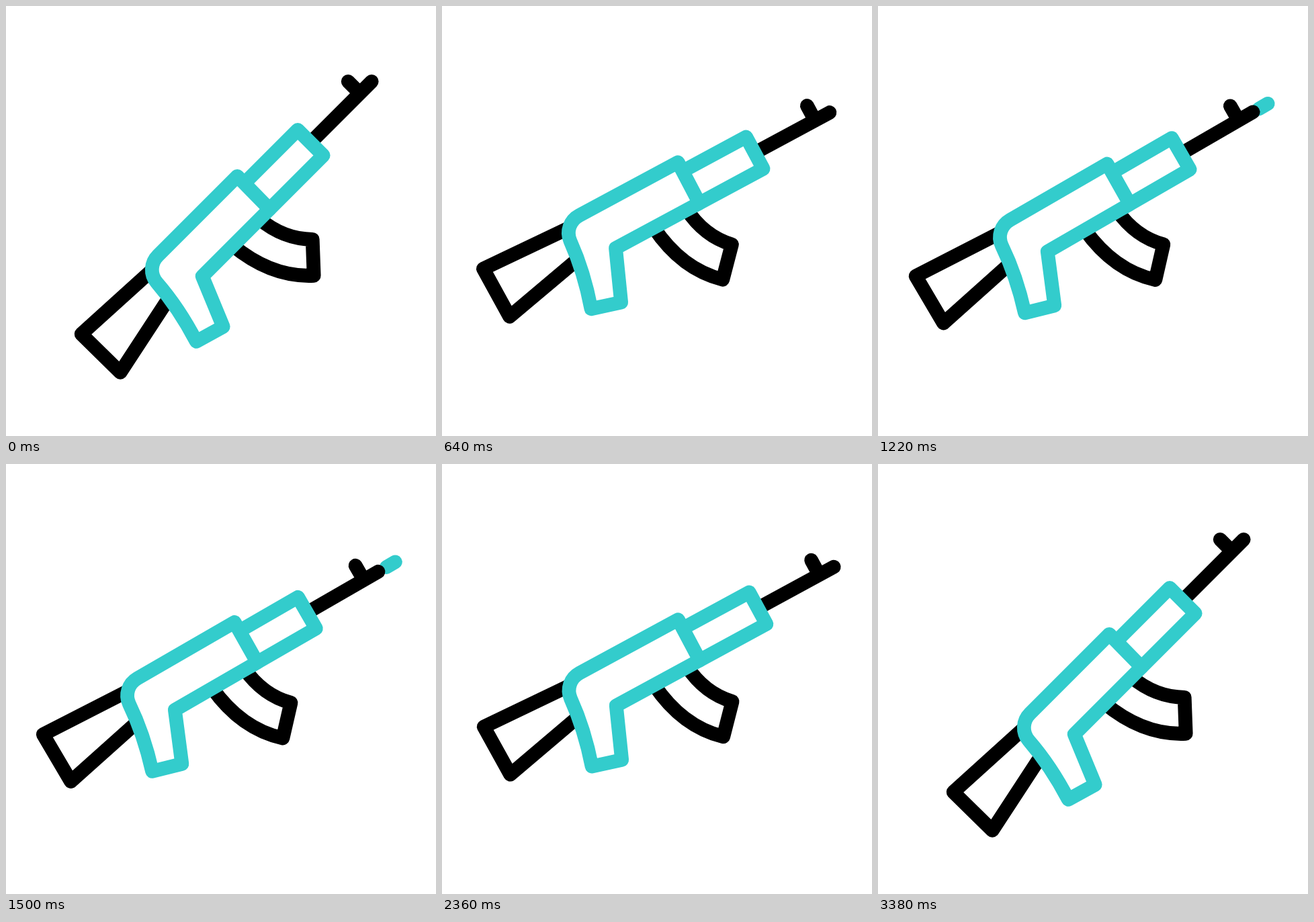
Write an HTML page with a canvas that moves like this. It is 640x640 px and loops after 3.62 s.

```html
<!DOCTYPE html>
<html lang="en">
<head>
<meta charset="utf-8">
<title>Icon loop</title>
<style>
html, body { margin: 0; width: 100%; height: 100%; overflow: hidden; background: #fff; }
canvas { display: block; width: 100vmin; height: 100vmin; }
</style>
</head>
<body>
<canvas id="stage" width="640" height="640"></canvas>
<script>
const ctx = document.getElementById('stage').getContext('2d');
const LOOP = 3620, STEP = 20;
const TEAL = '#33cccc', BLACK = '#000';
const SHOT = 260, SHOTS = 5, FIRST = 680;
const RAD = Math.PI / 180;

const shapes = {
  stock: new Path2D('M217 393L112 488L170 545L240 438'),
  mag: new Path2D('M376 316Q413 347 456 347L458 401Q395 404 337 356Z'),
  barrel: new Path2D('M453 203L544 112M509 112L523 126'),
  guard: new Path2D('M354 264L434 184L472 222L392 302'),
  body: new Path2D('M344 253L226 371C215 382 214 399 224 411Q257 449 283 499L323 477L292 402L392 302Z')
};

// Poses: angle in degrees, then where the stage centre lands
const REST = [0, 320.2, 320.3];
const AIM = [15, 301.6, 292.9];
const LIFT = [17.5, 312.3, 288.6];
const LEAVE = [16.5, 309.4, 289];

const part = (t, a, b) => Math.min(1, Math.max(0, (t - a) / (b - a)));
const ease = (t, a, b) => { const u = part(t, a, b); return u * u * (3 - 2 * u); };
const mix = (p, q, k) => p.map((v, i) => v + (q[i] - v) * k);

function poseAt(t) {
  if (t < 580) return mix(REST, LIFT, ease(t, 205, 580));
  if (t < 2080) return mix(LIFT, AIM, ease(t, 580, 740));
  if (t < 2370) return mix(AIM, LEAVE, ease(t, 2080, 2370));
  return mix(LEAVE, REST, ease(t, 2370, 2700));
}

function kickAt(t) {
  const s = t - FIRST + 20;
  if (s < 0 || s >= SHOT * SHOTS) return 0;
  const q = s % SHOT;
  return q < 100 ? ease(q, 0, 100) : 1 - ease(q, 100, SHOT);
}

function magAt(t) {
  if (t < 2950) return 1 - Math.pow(1 - part(t, 2380, 2900), 2.55);
  return 1 - ease(t, 2950, 3380);
}

function draw(path, color, filled) {
  if (filled) {
    ctx.fillStyle = '#fff';
    ctx.fill(path);
  }
  ctx.strokeStyle = color;
  ctx.stroke(path);
}

// Shift along the barrel axis; positive is forward
function along(d, fn) {
  ctx.save();
  ctx.translate(d * Math.SQRT1_2, -d * Math.SQRT1_2);
  fn();
  ctx.restore();
}

function drawBullet(t) {
  const s = t - FIRST;
  if (s < 0 || s >= SHOT * SHOTS) return;
  const u = Math.min(1, (s % SHOT) / 240);
  along(42 * Math.pow(u, 3.6), () => {
    const p = new Path2D();
    p.moveTo(551.8, 104.5);
    p.lineTo(541, 115.3);
    draw(p, TEAL);
  });
}

function drawMag(k) {
  ctx.save();
  ctx.translate(406.8 + 55.5 * k, 355 + 1.5 * k);
  ctx.rotate(-36.6 * RAD * k);
  ctx.translate(-406.8, -355);
  draw(shapes.mag, BLACK, true);
  ctx.restore();
}

function render(t) {
  const [angle, x, y] = poseAt(t);
  const kick = kickAt(t);
  const slide = ease(t, 540, 695) - ease(t, 2080, 2370) + kick;

  ctx.setTransform(1, 0, 0, 1, 0, 0);
  ctx.fillStyle = '#fff';
  ctx.fillRect(0, 0, 640, 640);
  ctx.lineWidth = 20.8;
  ctx.lineCap = ctx.lineJoin = 'round';
  ctx.translate(x, y);
  ctx.rotate(angle * RAD);
  ctx.translate(-320, -320);

  along(-3.5 * kick, () => {
    drawBullet(t);
    draw(shapes.stock, BLACK);
    drawMag(magAt(t));
    along(-10.1 * slide - 2.6 * kick, () => draw(shapes.barrel, BLACK));
    along(-7.3 * slide, () => draw(shapes.guard, TEAL, true));
    draw(shapes.body, TEAL, true);
  });
}

const start = performance.now();
function tick() {
  const t = (performance.now() - start) % LOOP;
  render(Math.floor(t / STEP) * STEP);
  requestAnimationFrame(tick);
}
tick();
</script>
</body>
</html>
```
